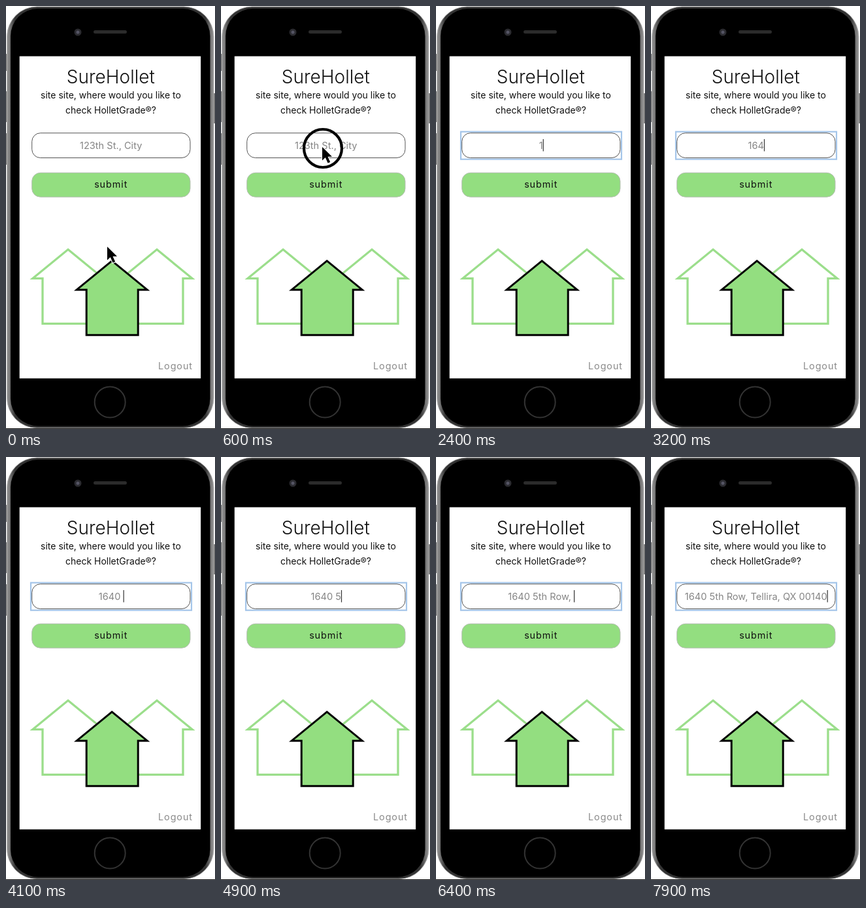
An HTML page that plays this animation: 320 by 645 pixels, repeating every 8000 ms.

```html
<!DOCTYPE html>
<html lang="en">
<head>
<meta charset="utf-8">
<title>Address search</title>
<style>
  html, body { margin: 0; width: 100%; height: 100%; overflow: hidden; background: #fff; }
  svg { display: block; width: 100vw; height: 100vh; }
  text { font-family: Inter, "Open Sans", sans-serif; font-size: 14px; text-anchor: middle; fill: #111; }
  .title { font-size: 28px; font-weight: 300; }
  .label { font-size: 14.4px; letter-spacing: .9px; }
  .muted { fill: #8a8a8a; }
  #entry { font-size: 14.6px; fill: #858585; }
  .outline { fill: #fff; stroke: #9bde8b; stroke-width: 3.3; }
</style>
</head>
<body>
<svg viewBox="0 0 320 645">
  <defs>
    <linearGradient id="rim">
      <stop offset="0" stop-color="#999"/>
      <stop offset=".02" stop-color="#666"/>
      <stop offset=".04" stop-color="#333"/>
      <stop offset=".96" stop-color="#333"/>
      <stop offset=".98" stop-color="#666"/>
      <stop offset="1" stop-color="#999"/>
    </linearGradient>
    <path id="house" d="M0 0L54 44H40V113H-39V44H-54Z"/>
  </defs>

  <!-- Phone -->
  <g fill="#777">
    <rect y="73" width="3" height="26"/>
    <rect y="130" width="3" height="47"/>
    <rect y="194" width="3" height="48"/>
    <rect x="317" y="133" width="3" height="46"/>
  </g>
  <rect x="1.5" y="1" width="316.5" height="642.5" rx="46" fill="url(#rim)" stroke="#aaa" stroke-width=".8"/>
  <rect x="7" y="4" width="305.5" height="636.5" rx="42"/>
  <rect y="644" width="320" height="1"/>
  <circle cx="110" cy="40" r="5.5" fill="#2b2b30"/>
  <circle cx="110" cy="40" r="2.5" fill="#555565"/>
  <rect x="134" y="37" width="51" height="5" rx="2.5" fill="#2b2b2b"/>
  <circle cx="159.2" cy="604" r="23.5" stroke="#333" stroke-width="2"/>

  <!-- Screen -->
  <rect x="20.7" y="76.6" width="277.5" height="491.2" fill="#fff"/>
  <text class="title" x="160.3" y="118">SureHollet</text>
  <text x="160.5" y="140.7">site site, where would you like to</text>
  <text x="160.5" y="164.2">check HolletGrade®?</text>

  <rect id="focus" x="38" y="191.7" width="246" height="42" fill="none" stroke="#a4c5e9" stroke-width="2.2"/>
  <rect x="39.7" y="193.7" width="242.3" height="37.8" rx="13" fill="#fff" stroke="#555"/>
  <text id="entry" x="160.7" y="217.7"></text>
  <rect id="caret" y="203" width="1.2" height="18.5" fill="#333"/>

  <rect x="39.7" y="254.3" width="242.3" height="36.9" rx="13" fill="#93de80" stroke="#b3bdb0"/>
  <text class="label" x="160.7" y="277.2">submit</text>

  <use href="#house" class="outline" x="95" y="371.3"/>
  <use href="#house" class="outline" x="231" y="371.3"/>
  <use href="#house" x="162.2" y="388.7" fill="#93de80" stroke="#000" stroke-width="3"/>
  <text class="label muted" x="259.5" y="554.2">Logout</text>

  <!-- Pointer -->
  <circle id="ring" fill="none" stroke="#000" stroke-width="4.2"/>
  <path id="arrow" d="M0 0V20.5L4.8 16L8.6 24.5L12.2 23L8.5 14.8H15Z" stroke="#fff" stroke-width="2.4" paint-order="stroke"/>
  <path id="beam" d="M-4 -10.5Q0 -10.5 0 -7Q0 -10.5 4 -10.5M0 -7V8M-4 11.5Q0 11.5 0 8Q0 11.5 4 11.5M-2.5 3H2.5" fill="none" stroke="#111" stroke-width="1.4"/>
</svg>

<script>
const DURATION = 8000, CENTER = 160.7;
const FOCUS_AT = 900, TYPING_AT = 2300, RING_START = 500, RING_END = 1400;
const PLACEHOLDER = "123th St., City";

// Each keystroke group: start time and the text it adds.
const KEYS = [
  [2300, "1"], [2800, "6"], [3200, "4"], [3500, "0"], [3900, " "],
  [4700, "5"], [5000, "t"], [5100, "h"],
  [5900, " "], [6000, "R"], [6100, "o"], [6200, "w"], [6300, ","], [6400, " "],
  [6700, "Te"], [7000, "ll"], [7100, "ir"], [7200, "a,"], [7300, " Q"], [7400, "X "],
  [7700, "00"], [7800, "1"], [7900, "40"]
];

const [focus, entry, caret, ring, arrow, beam] =
  ["focus", "entry", "caret", "ring", "arrow", "beam"].map(id => document.getElementById(id));

const clamp = v => Math.min(1, Math.max(0, v));
const ease = v => v * v * (3 - 2 * v);
const show = (el, on) => el.setAttribute("visibility", on ? "visible" : "hidden");
const setAttrs = (el, attrs) => {
  for (const name in attrs) el.setAttribute(name, attrs[name]);
};

function drawField(t) {
  const pressed = KEYS.filter(([at]) => at <= t);
  const typed = pressed.map(([, chars]) => chars).join("").replaceAll(" ", "\u00a0");
  const lastKey = pressed.length ? pressed[pressed.length - 1][0] : FOCUS_AT;
  entry.textContent = typed || PLACEHOLDER;
  const typedWidth = typed ? entry.getComputedTextLength() : 0;
  caret.setAttribute("x", CENTER + typedWidth / 2);
  show(caret, t >= FOCUS_AT && (t - lastKey) % 1000 < 500);
  show(focus, t >= FOCUS_AT);
}

function drawPointer(t) {
  const y = 367 - 152 * ease(clamp((t - 100) / 400));
  arrow.setAttribute("transform", `translate(155 ${y})`);
  beam.setAttribute("transform", "translate(157.5 214)");
  show(arrow, t < FOCUS_AT);
  show(beam, t >= FOCUS_AT && t < TYPING_AT);

  const shift = clamp((t - 600) / 400);
  setAttrs(ring, {
    cx: 156 + shift,
    cy: 217 - 2.5 * shift,
    r: 29 - 7 * (t - 600) / 400,
    opacity: 1 - clamp((t - 1100) / 300)
  });
  show(ring, t >= RING_START && t < RING_END);
}

function frame(now) {
  const t = now % DURATION;
  drawField(t);
  drawPointer(t);
  requestAnimationFrame(frame);
}
frame(0);
</script>
</body>
</html>
```
